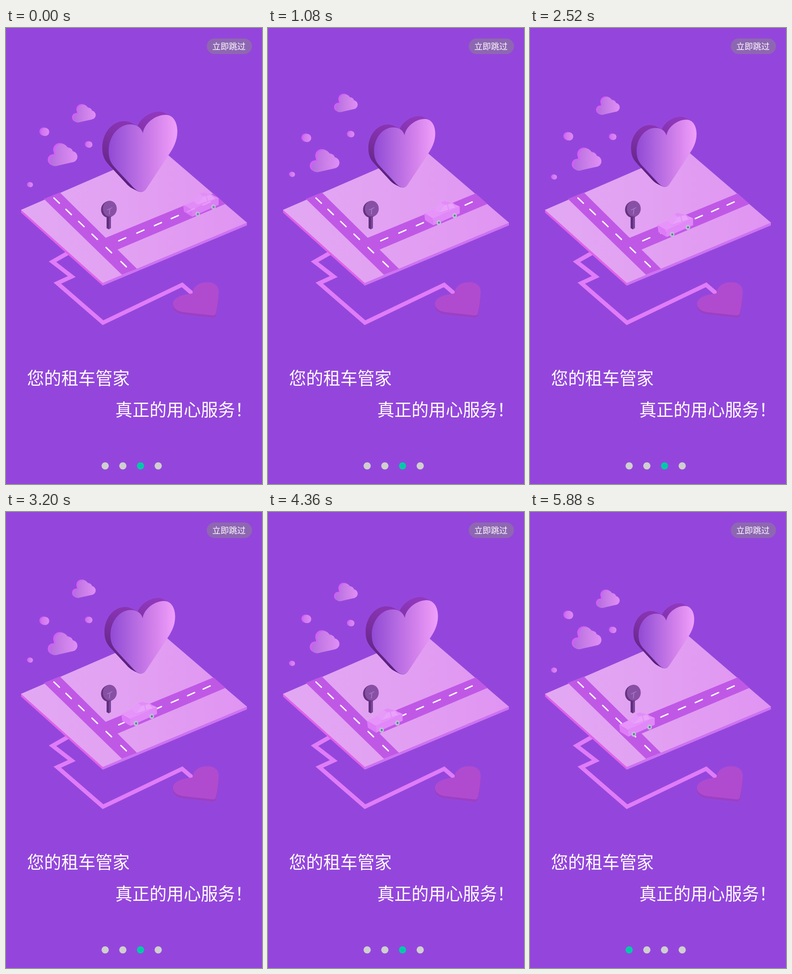
These frames come from a looping animation (561 by 998 pixels, 5.96 s). An HTML page with a canvas:

```html
<!DOCTYPE html>
<html lang="zh-CN">
<head>
<meta charset="utf-8">
<style>
html, body { margin: 0; width: 100%; height: 100%; overflow: hidden; background: #9446dc; }
canvas { display: block; width: 561px; height: 998px; }
</style>
</head>
<body>
<canvas id="stage" width="561" height="998"></canvas>
<script>
const ctx = document.getElementById('stage').getContext('2d');
const LOOP = 5960, STEP = 40, LAST = 5880;
const LEAD = 110; // motions are already this far along when the loop starts
const FONT = '"Noto Sans CJK SC", "Noto Sans CJK", "Noto Sans SC", sans-serif';

function poly(color, ...pts) {
  ctx.beginPath();
  for (let i = 0; i < pts.length; i += 2) ctx.lineTo(pts[i], pts[i + 1]);
  ctx.closePath();
  ctx.fillStyle = color;
  ctx.fill();
}

function line(color, width, cap, ...pts) {
  ctx.beginPath();
  for (let i = 0; i < pts.length; i += 2) ctx.lineTo(pts[i], pts[i + 1]);
  ctx.strokeStyle = color;
  ctx.lineWidth = width;
  ctx.lineCap = cap;
  ctx.stroke();
}

function oval(color, x, y, rx, ry = rx) {
  ctx.beginPath();
  ctx.ellipse(x, y, rx, ry, 0, 0, Math.PI * 2);
  ctx.fillStyle = color;
  ctx.fill();
}

function gradient(x0, y0, x1, y1, ...colors) {
  const g = ctx.createLinearGradient(x0, y0, x1, y1);
  colors.forEach((c, i) => g.addColorStop(i / (colors.length - 1), c));
  return g;
}

function text(str, x, y, size, weight = 400) {
  ctx.font = `${weight} ${size}px ${FONT}`;
  ctx.fillStyle = '#fff';
  ctx.fillText(str, x, y);
}

// Repeats a shape from the offset (dx, dy) up to its own place
function extrude(dx, dy, steps, paint) {
  for (let i = steps; i > 0; i--) {
    ctx.save();
    ctx.translate(dx * i / steps, dy * i / steps);
    paint();
    ctx.restore();
  }
}

// Goes 0 to 1 and back to 0 at constant speed
function bounce(t, half) {
  const p = (t / half) % 2;
  return p < 1 ? p : 2 - p;
}

const bigHeart = new Path2D('M300 230C303 208 328 190 350 190C366 190 375.5 206 375.5 226' +
  'C375.5 248 366 264 355 280L308 351Q301 362 291 358Q285 355 280 350L240 307' +
  'C228 294 225 284 225 268C225 238 246 211 272 211C287 211 296 218 300 230Z');
const flatHeart = new Path2D('M409 581C409 567 422 556.5 441 556.5C456 556.5 466 564 466 576' +
  'C466 592 463 612 460 624Q459 629 453 629L390 622C374 620 365 612 366 602' +
  'C368 589 388 583 409 581Z');

const topFill = gradient(33, 0, 528, 0, '#e2a8f3', '#e2a0f2', '#e094f2');
const heartFill = gradient(225, 0, 376, 0, '#914ad5', '#b167e0', '#d381eb', '#f0a0fb');
const heartSide = gradient(240, 183, 225, 350, '#9138bd', '#752c9a', '#55207a');
const cloudFill = gradient(94, 0, 157, 0, '#b46be0', '#cb7fe8', '#e18ff6');

function fillPath(path, color) {
  ctx.fillStyle = color;
  ctx.fill(path);
}

function route() {
  line('#e07cf8', 9, 'butt', 140, 490, 102, 511.5, 144, 544, 112.5, 558.5,
    212.5, 645, 386, 562, 408, 581);
  extrude(0, 5, 5, () => fillPath(flatHeart, '#9c40c4'));
  fillPath(flatHeart, '#b04bcf');
}

function platform() {
  poly('#e062ea', 33, 397, 212, 557, 212, 564, 33, 404);
  poly('#cd72f1', 212, 557, 528, 425, 528, 432, 212, 564);
  poly(topFill, 33, 398, 340, 265, 528, 426, 212, 558);
  poly('#c058e6', 83, 374, 118, 360, 287, 527, 254, 540);
  poly('#c058e6', 214, 461, 455, 362, 481, 385, 242, 486);
  // Gaps between dashes grow towards the viewer
  for (let i = 0; i < 6; i++) {
    const a = 25.5 * i + 0.77 * i * i;
    const b = 40.5 * i - 0.7 * i * i;
    line('#fff', 3, 'round', 105 + a, 372 + a * 0.948, 117 + a, 383.5 + a * 0.948);
    line('#fff', 3, 'round', 247 + b, 465.8 - b * 0.423, 262.5 + b, 459 - b * 0.423);
  }
}

function sign() {
  poly('#5d2c7b', 220.5, 410, 226, 410, 226, 441, 220.5, 438);
  poly('#7a469a', 225.5, 410, 230, 410, 230, 438, 225.5, 440.5);
  extrude(-4, 2, 4, () => oval('#65337f', 227.5, 395.5, 15.2, 17.5));
  oval('#8850a5', 227.5, 395.5, 15.2, 17.3);
  line('#a678c4', 1.8, 'butt', 221.5, 398.5, 233, 393);
  line('#a678c4', 1.8, 'butt', 227.5, 396, 226.5, 408);
}

function car(t) {
  // Speed rises a little, then eases to a stop
  const w = Math.PI / 9400;
  const run = 133 * (Math.sin(w * (t - 1400)) + Math.sin(w * 1400));
  ctx.save();
  ctx.globalAlpha = Math.min(1, 0.85 + t / 1000);
  ctx.translate(388 - run, 360 + run / 2.444);
  poly('#e794fa', 0, 27, 25, 15, 62, 5, 78, 12, 19, 38);
  poly('#de7cf7', 0, 27, 19, 38, 20, 53, 2, 42);
  poly('#e188f8', 19, 37.5, 78, 12, 78, 27, 20, 53);
  poly('#e28cf8', 22, 18, 37, 3, 45, 0, 65, 5, 71, 15, 32, 28);
  poly('#e9a2fa', 32, 26, 44, 9, 61, 5, 69, 14);
  poly('#e69afa', 22, 18, 37, 3, 44, 9, 32, 27);
  line('#e28cf8', 2, 'butt', 51, 7, 54, 20);
  for (const [x, y] of [[32, 47.3], [66.5, 31.8]]) {
    oval('#c3bad6', x, y, 5.2, 5.8);
    oval('#3f8296', x + 0.4, y, 2, 2.3);
  }
  ctx.restore();
}

function heart(t) {
  const scale = (1 - 0.2 * bounce(t + LEAD, 2000)) / 0.989;
  ctx.save();
  ctx.translate(293.2, 271.6);
  ctx.scale(scale, scale);
  ctx.translate(-293.2, -271.6);
  extrude(-14, -7, 28, () => fillPath(bigHeart, heartSide));
  fillPath(bigHeart, heartFill);
  ctx.restore();
}

function puff(color) {
  oval(color, 107.5, 290.5, 12);
  oval(color, 122, 268.5, 14.5);
  oval(color, 137, 272, 9.5);
  oval(color, 144.5, 282, 12);
  poly(color, 109, 302.4, 147, 293.8, 146, 270, 122, 260, 109, 275);
}

function cloud(x, y, scale) {
  ctx.save();
  ctx.translate(x, y);
  ctx.scale(scale, scale);
  ctx.translate(-92, -252);
  extrude(-4, -2, 4, () => puff('#d45ff8'));
  puff(cloudFill);
  ctx.restore();
}

function ball(x, y, r) {
  const d = r * 0.2;
  const fill = gradient(x - r, 0, x + r, 0, '#c674ea', '#e086f5');
  extrude(-2 * d, -d / 2, 4, () => oval('#d45ff8', x + d, y + d / 4, r));
  oval(fill, x + d, y + d / 4, r);
}

function sky(t) {
  const p = bounce(t + LEAD, 1000);
  const up = 4 - 32.3 * p;
  const down = 19 * p - 2.3;
  cloud(145, 166 + up, 0.8);
  ball(181.2, 254.3 + up, 6.9);
  ball(52.6, 342.3 + up, 5.4);
  cloud(92, 252 + down, 1);
  ball(84, 227.2 + down, 9);
}

function controls(t) {
  ctx.beginPath();
  ctx.roundRect(440, 23, 99, 34, 17);
  ctx.fillStyle = '#8e67b2';
  ctx.fill();
  text('立即跳过', 452, 46.7, 18.3);
  text('您的租车管家', 46, 779.5, 37.5, 300);
  text('真正的用心服务！', 239.5, 849, 37.5, 300);
  const active = t < 4890 ? 2 : 0;
  for (let i = 0; i < 4; i++)
    oval(i === active ? '#00c9a9' : '#cfcfcf', 217.3 + i * 38.75, 958.3, 7.9);
}

function draw(now) {
  const t = Math.min(LAST, Math.floor((now % LOOP) / STEP) * STEP);
  ctx.fillStyle = '#9446dc';
  ctx.fillRect(0, 0, 561, 998);
  route();
  platform();
  sign();
  car(t);
  heart(t);
  sky(t);
  controls(t);
}

let start;
function tick(now) {
  start ??= now;
  draw(now - start);
  requestAnimationFrame(tick);
}
draw(0);
requestAnimationFrame(tick);
</script>
</body>
</html>
```
